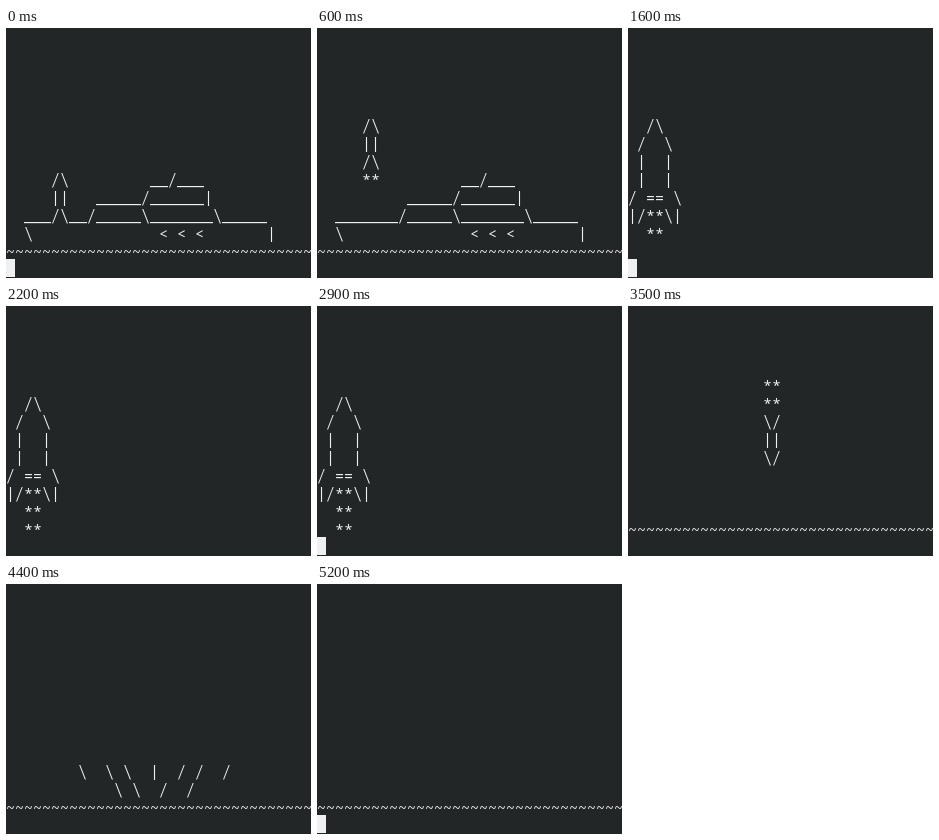
These frames come from a looping animation (305 px wide and 250 px high, 5400 ms). An HTML page:

```html
<!DOCTYPE html>
<html lang="en">
<head>
<meta charset="utf-8">
<title>ASCII rocket</title>
<style>
  html, body { margin: 0; width: 100%; height: 100%; overflow: hidden; background: #232627; }
  svg { display: block; fill: #eff0f1; }
  text { font: 15px "Noto Sans Mono", monospace; text-anchor: middle; }
  text.slash { font: 300 19px Roboto, sans-serif; }
</style>
</head>
<body>
<svg width="305" height="250" viewBox="0 0 305 250">
  <g id="screen"></g>
  <rect id="cursor" x="0" y="231" width="9" height="18"/>
</svg>
<script>
const LOOP = 5400, BLINK = 600;
const CELL = 9, LINE = 18, TOP = -3, BASE = 16;
const COLS = 34, GROUND = 12;
const NS = "http://www.w3.org/2000/svg";
const screenEl = document.getElementById("screen");
const cursorEl = document.getElementById("cursor");

const WAVES = "~".repeat(COLS);
const SHIP = [
  "                __/___",
  "          _____/______|",
  "  _______/_____\\_______\\_____",
  "  \\              < < <       |",
  WAVES
];
const ROCKET = ["/\\", "||", "/\\"];
const DIVER = ["**", "**", "\\/", "||", "\\/"];
const BIG = [
  "  /\\",
  " /  \\",
  " |  |",
  " |  |",
  "/ == \\",
  "|/**\\|",
  "  **"
];
const SPRAY_LOW = "            \\ \\  /  /";
const SPRAY_LOW_WIDE = "            \\ \\   /  /";
const SPRAY_MID = "        \\  \\ \\  |  / /  /";
const SPRAY_HIGH = "      \\  \\  \\   |   /  /  /";

// [start time, top row, flame rows]
const CLIMB = [[0, 8, 0], [200, 6, 0], [400, 5, 1], [700, 4, 2], [800, 3, 2],
               [1000, 2, 2], [1300, 1, 2], [1400, 0, 2]];
const DIVE = [[3500, 4], [3600, 5], [3800, 6], [4000, 7]];
// [start time, lines ending just above the water]
const SPLASH = [
  [4200, [SPRAY_LOW]],
  [4400, [SPRAY_MID, SPRAY_LOW]],
  [4600, [SPRAY_HIGH, SPRAY_MID, SPRAY_LOW_WIDE]],
  [4800, [SPRAY_MID, SPRAY_LOW]],
  [5000, [SPRAY_LOW]],
  [5200, []]
];
// The long flame flips on or off at each of these times.
const FLICKER = [1700, 1800, 1900, 2000, 2200, 2400, 2500, 2600, 2700, 2800,
                 2900, 3000, 3100, 3200, 3300];

const latest = (steps, t) => steps.filter(s => s[0] <= t).pop();

// Later sprites overwrite earlier ones; spaces are transparent.
function stamp(grid, lines, row, col = 0) {
  lines.forEach((line, i) => {
    [...line].forEach((ch, j) => {
      if (ch !== " ") grid[row + i][col + j] = ch;
    });
  });
}

function compose(t) {
  const grid = Array.from({ length: 14 }, () => Array(COLS).fill(" "));
  if (t < 1600) {
    const [, row, flames] = latest(CLIMB, t);
    stamp(grid, SHIP, 8);
    stamp(grid, ROCKET.concat(Array(flames).fill("**")), row, 5);
  } else if (t < 3500) {
    const flips = FLICKER.filter(at => at <= t).length;
    stamp(grid, BIG, 5);
    if (flips % 2) stamp(grid, ["**"], GROUND, 2);
  } else {
    stamp(grid, [WAVES], GROUND);
    if (t < 4200) {
      stamp(grid, DIVER, latest(DIVE, t)[1], 15);
    } else {
      const lines = latest(SPLASH, t)[1];
      stamp(grid, lines, GROUND - lines.length);
    }
  }
  return grid;
}

// Distance of tall glyphs below the common baseline.
const DROP = { "/": 1, "\\": 1, "|": -1 };

function glyph(ch, col, row) {
  const el = document.createElementNS(NS, "text");
  if (ch === "/" || ch === "\\") el.setAttribute("class", "slash");
  el.setAttribute("x", (col + 0.5) * CELL);
  el.setAttribute("y", TOP + row * LINE + BASE + (DROP[ch] || 0));
  el.textContent = ch;
  return el;
}

let shown = "";
function render(t) {
  cursorEl.style.display = Math.floor(t / BLINK) % 2 ? "none" : "";
  const grid = compose(t);
  const key = grid.map(line => line.join("")).join("\n");
  if (key === shown) return;
  shown = key;
  const cells = [];
  grid.forEach((line, row) => line.forEach((ch, col) => {
    if (ch !== " ") cells.push(glyph(ch, col, row));
  }));
  screenEl.replaceChildren(...cells);
}

const start = performance.now();
function loop() {
  render((performance.now() - start) % LOOP);
  requestAnimationFrame(loop);
}
render(0);
requestAnimationFrame(loop);
</script>
</body>
</html>
```
